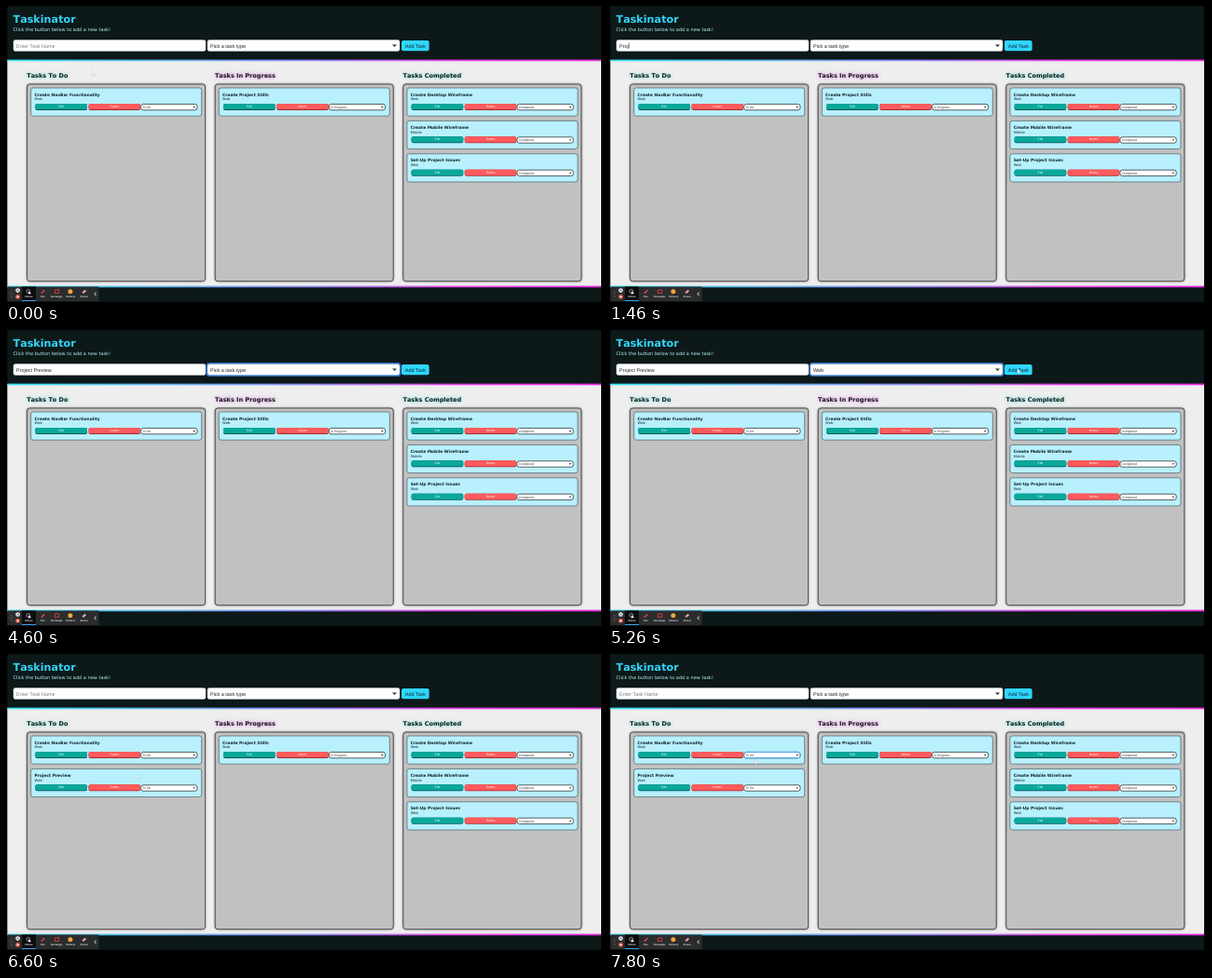
Write an HTML page that moves like this. It is 640 by 318 pixels and loops after 8 s.

```html
<!DOCTYPE html>
<html lang="en">
<head>
<meta charset="utf-8">
<title>Taskinator</title>
<style>
  html, body { margin: 0; width: 100%; height: 100%; overflow: hidden; background: #000; }
  svg { display: block; width: 100vw; height: 100vh; }
  text { font-family: "Liberation Sans", Arial, sans-serif; text-rendering: geometricPrecision; white-space: pre; }
  .wide { font-family: "DejaVu Sans", Verdana, sans-serif; font-kerning: none; }
  .bold { font-weight: 700; }
  .mid { text-anchor: middle; }
  .field { fill: #fff; stroke: #ced4da; stroke-width: .4; }
  .field-text { font-size: 5.45px; fill: #212529; }
  .heading { font-size: 6.5px; fill: #10201f; }
  .cyan { filter: drop-shadow(0 0 2.2px #5fe3d8); }
  .pink { filter: drop-shadow(0 0 2.2px #ee62ec); }
  .column { fill: #c1c1c1; stroke: #333; stroke-width: .8; filter: drop-shadow(0 .6px .8px rgba(0, 0, 0, .5)); }
  .card { fill: #b8f0fe; stroke: #34494e; stroke-width: .6; }
  .card-title { font-size: 4.43px; fill: #10262b; }
  .card-type { font-size: 3.7px; fill: #10262b; }
  .btn-text { font-size: 3.3px; fill: #f0ffff; }
  .pick { fill: #fff; stroke: #1c1c1c; stroke-width: .7; }
  .pick-text { font-size: 3.35px; fill: #333; }
  .arrow { fill: #333; }
  .tool { font-size: 2.6px; fill: #e8e8e8; font-weight: 700; }
  .ring { fill: none; stroke: #5aaef5; stroke-width: 1; }

  #cursor { animation: move 8s linear infinite, seen 8s step-end infinite; }
  #newCard { animation: added 8s step-end infinite; }
  #typeRing { animation: typeFocus 8s step-end infinite; }
  #statusRing { animation: statusFocus 8s step-end infinite; }
  #pickHint { animation: hint 8s step-end infinite; }
  #pickWeb { animation: chosen 8s step-end infinite; }

  @keyframes move {
    0%, .75% { transform: translate(92px, 70px); }
    5.75%, 7.5% { transform: translate(50px, 41px); }
    12.5%, 39.9% { transform: translate(44px, 42px); }
    40% { transform: translate(222.5px, 40px); }
    46.6%, 57.4% { transform: translate(236px, 42px); }
    57.5%, 58.5% { transform: translate(236px, 68px); }
    65.75%, 67.5% { transform: translate(438px, 42px); }
    73.25% { transform: translate(393px, 60px); }
    77.5%, 78.25% { transform: translate(243px, 98px); }
    82.5% { transform: translate(140px, 129.5px); }
    88.25%, 89.1% { transform: translate(172px, 118px); }
    96%, 100% { transform: translate(156px, 113.5px); }
  }
  @keyframes seen { 0% { opacity: 1; } 14.1% { opacity: 0; } 40%, 100% { opacity: 1; } }
  @keyframes added { 0% { opacity: 0; } 68.25%, 100% { opacity: 1; } }
  @keyframes typeFocus { 0% { opacity: 0; } 46.6% { opacity: 1; } 67.5%, 100% { opacity: 0; } }
  @keyframes statusFocus { 0% { opacity: 0; } 96.6%, 100% { opacity: 1; } }
  @keyframes hint { 0% { opacity: 1; } 58.3% { opacity: 0; } 68.25%, 100% { opacity: 1; } }
  @keyframes chosen { 0% { opacity: 0; } 58.3% { opacity: 1; } 68.25%, 100% { opacity: 0; } }
</style>
</head>
<body>
<svg viewBox="0 0 640 318" preserveAspectRatio="none">
  <defs>
    <linearGradient id="neon">
      <stop offset="0" stop-color="#35e6f2"/>
      <stop offset=".5" stop-color="#8d8cf5"/>
      <stop offset=".75" stop-color="#e945ee"/>
      <stop offset="1" stop-color="#f02fe6"/>
    </linearGradient>
  </defs>

  <rect width="640" height="318" fill="#000"/>
  <rect x="1.4" width="636.6" height="318" fill="#0d1819"/>
  <rect x="1.4" y="58" width="636.6" height="244" fill="#eeeeee"/>
  <rect x="1.4" y="57.6" width="636.6" height="1.7" fill="url(#neon)"/>
  <rect x="1.4" y="300.6" width="636.6" height="1.7" fill="url(#neon)"/>

  <text class="wide bold" x="7.5" y="18.3" font-size="11.2" fill="#33d6fa">Taskinator</text>
  <text class="wide" x="7.5" y="27.4" font-size="5" fill="#b5f3f8">Click the button below to add a new task!</text>

  <rect class="field" x="8" y="36.5" width="206" height="12" rx="2"/>
  <text id="placeholder" class="field-text" x="11" y="44.5" style="fill:#7a8087">Enter Task Name</text>
  <text id="typed" class="field-text" x="11" y="44.5"></text>
  <rect id="caret" x="11" y="39.8" width=".6" height="5.8" fill="#222"/>

  <rect class="field" x="216" y="36.5" width="206" height="12" rx="2"/>
  <g id="typeRing">
    <rect class="ring" x="215.3" y="35.8" width="207.4" height="13.4" rx="2.7" style="stroke:#3573c4;stroke-width:1.4"/>
    <rect class="ring" x="216" y="36.5" width="206" height="12" rx="2" style="stroke:#86b7fe;stroke-width:.5"/>
  </g>
  <text id="pickHint" class="field-text" x="219" y="44.5">Pick a task type</text>
  <text id="pickWeb" class="field-text" x="219" y="44.5">Web</text>
  <path class="arrow" d="M414 41.4h5l-2.5 2.7z"/>
  <rect x="424" y="37" width="29.6" height="11.2" rx="2" fill="#2fd6fd"/>
  <text class="field-text mid" x="438.9" y="44.5" style="fill:#0b2a33">Add Task</text>

  <g id="board"></g>

  <g id="toolbar">
    <rect x="1.4" y="301.5" width="98.1" height="15.5" fill="#2b2c2e"/>
    <rect x="17" y="301.5" width="15" height="15.5" fill="#0c0d0f"/>
    <rect x="17" y="316" width="15" height="1" fill="#3aa0e8"/>
    <path d="M5.2 306v7M6.8 306v7" stroke="#777" stroke-width=".6" stroke-dasharray=".8 .8"/>
    <circle cx="12.6" cy="305.6" r="2.4" fill="#e8e8e8"/>
    <path d="M11.7 304.7l1.8 1.8m0-1.8l-1.8 1.8" stroke="#333" stroke-width=".6"/>
    <circle cx="12.6" cy="312.4" r="2.4" fill="#e5533f"/>
    <rect x="11.7" y="311.5" width="1.8" height="1.8" fill="#fff"/>
    <circle cx="23.8" cy="306.4" r="1.9" fill="none" stroke="#ddd" stroke-width=".6"/>
    <path d="M24.2 306.2l3 2.8h-1.7l-1.3 1z" fill="#fff"/>
    <path d="M37.8 308.8l3.6-3.6" stroke="#e8403c" stroke-width="1.5"/>
    <rect x="52.3" y="305" width="4.4" height="3.4" fill="none" stroke="#e8403c" stroke-width=".8"/>
    <circle cx="68.9" cy="306.8" r="2.5" fill="#f3a63a"/>
    <path d="M82.2 308.2l3.2-2.6" stroke="#e9a9b4" stroke-width="2"/>
    <path d="M96.5 307.6l-1.5 1.8 1.5 1.8" fill="none" stroke="#fff" stroke-width=".9"/>
  </g>

  <path id="cursor" d="M0 0v4.6l1.1-1 .9 1.7.8-.4-.8-1.7h1.5z" fill="#fff" stroke="#999" stroke-width=".3"/>
</svg>

<script>
const LOOP = 8000;
const CARD_GAP = 35.4;
const columns = [
  { title: "Tasks To Do", glow: "cyan", status: "To Do",
    cards: [["Create NavBar Functionality", "Web"], ["Project Preview", "Web", "newCard"]] },
  { title: "Tasks In Progress", glow: "pink", status: "In Progress",
    cards: [["Create Project Stills", "Web"]] },
  { title: "Tasks Completed", glow: "cyan", status: "Completed",
    cards: [["Create Desktop Wireframe", "Web"], ["Create Mobile Wireframe", "Mobile"], ["Set-Up Project Issues", "Web"]] }
];

const el = id => document.getElementById(id);

const button = (x, label, fill, edge) => `
  <rect x="${x}" y="16.9" width="55.6" height="7" rx="2" fill="${edge}"/>
  <rect x="${x}" y="16.9" width="55.6" height="6.2" rx="2" fill="${fill}"/>
  <text class="btn-text mid" x="${x + 27.8}" y="21.1">${label}</text>`;

const card = (status, [title, type, id], i) => `
  <g transform="translate(26.7 ${88 + i * CARD_GAP})"><g ${id ? `id="${id}"` : ""}>
    <rect class="card" width="183" height="30.2" rx="2.5"/>
    <text class="card-title wide bold" x="3.8" y="8.6">${title}</text>
    <text class="card-type wide" x="3.8" y="13.4">${type}</text>
    ${button(4.7, "Edit", "#0aa79b", "#075650")}
    ${button(61.8, "Delete", "#ff5a5c", "#a32b31")}
    <rect class="pick" x="118" y="17.4" width="60.3" height="6.4" rx="2.4"/>
    <text class="pick-text" x="119.8" y="21.8">${status}</text>
    <path class="arrow" d="M173.6 19.9h2.8l-1.4 1.5z"/>
  </g></g>`;

el("board").innerHTML = columns.map((c, i) => `
  <g transform="translate(${i * 201.6} 0)">
    <text class="heading wide bold ${c.glow}" x="22.3" y="76.8">${c.title}</text>
    <rect class="column" x="22.6" y="84" width="191" height="211.7" rx="3"/>
    ${c.cards.map((item, n) => card(c.status, item, n)).join("")}
  </g>`).join("") +
  `<rect id="statusRing" class="ring" x="144.7" y="105.4" width="60.3" height="6.4" rx="2.4"/>`;

el("toolbar").insertAdjacentHTML("beforeend",
  ["Mouse", "Pen", "Rectangle", "Stickers", "Eraser"].map((name, i) =>
    `<text class="tool mid" x="${24.7 + i * 14.8}" y="313.2">${name}</text>`).join(""));

// Moment each key is pressed, in ms
const phrase = "Project Preview";
const keys = [1130, 1260, 1400, 1460, 1530, 1660, 1730, 1930, 2000, 2200, 2260, 2460, 2530, 2600, 2660];
const FOCUS = 860, BLUR = 3730, SUBMIT = 5460;

let start, shown;
function frame(now) {
  start ??= now;
  const t = (now - start) % LOOP;
  const count = t < SUBMIT ? keys.filter(k => k <= t).length : 0;
  if (count !== shown) {
    shown = count;
    el("typed").textContent = phrase.slice(0, count);
    el("placeholder").style.opacity = count ? 0 : 1;
    el("caret").setAttribute("x", 11.2 + (count ? el("typed").getComputedTextLength() : 0));
  }
  el("caret").style.opacity = t >= FOCUS && t < BLUR ? 1 : 0;
  requestAnimationFrame(frame);
}
requestAnimationFrame(frame);
</script>
</body>
</html>
```
